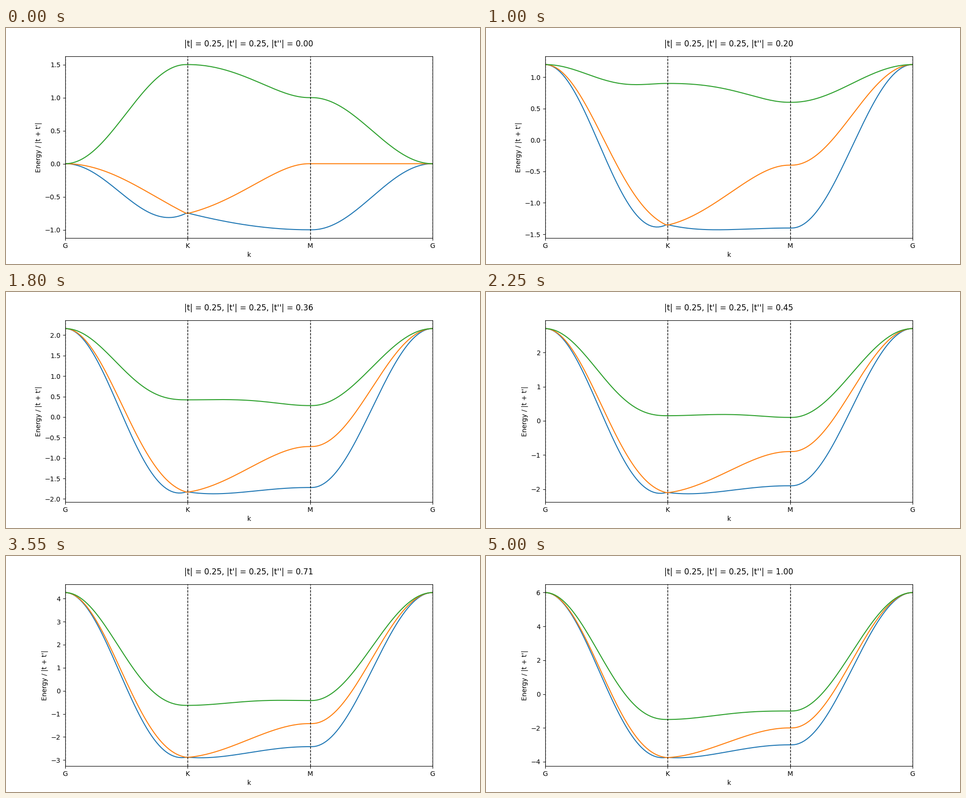
Recreate the animation shown at these times as a matplotlib script. Size 1000x500 px, loop 7000 ms.

```python
import numpy as np
import matplotlib.pyplot as plt
from matplotlib.animation import FuncAnimation

T1, T2 = 0.25, 0.25
STEPS, FRAMES, INTERVAL = 100, 140, 50
N = 50  # samples per path segment, both corners included

# Half phases k.a_i / 2 at the corners of the path G-K-M-G
CORNERS = np.pi * np.array([
    [0, 0, 0],
    [2 / 3, 1 / 3, 1 / 3],
    [1 / 2, 1 / 2, 0],
    [0, 0, 0],
])
phase = np.concatenate([np.linspace(a, b, N)
                        for a, b in zip(CORNERS, CORNERS[1:])])
x = np.linspace(0, 3, len(phase))


def base_bands():
    """Eigenvalues of the three-site model without t'', in units of |t + t'|."""
    s = np.sin(phase)
    h = s[:, :, None] * s[:, None, :]
    h[:, range(3), range(3)] = 0
    return np.linalg.eigvalsh(h)


bands = base_bands()
shift = 2 * np.cos(2 * phase).sum(axis=1, keepdims=True)

fig, ax = plt.subplots(figsize=(10, 5), dpi=100)
lines = ax.plot(x, bands)
for corner in range(4):
    ax.axvline(corner, color="black", linestyle="--", linewidth=1)
ax.set_xlim(0, 3)
ax.set_xticks(range(4), ["G", "K", "M", "G"])
ax.set_xlabel("k")
ax.set_ylabel("Energy / |t + t'|")


def update(frame):
    t3 = min(frame, STEPS) / STEPS
    energy = bands + t3 * shift
    for line, e in zip(lines, energy.T):
        line.set_ydata(e)
    low, high = energy.min(), energy.max()
    pad = 0.05 * (high - low)
    ax.set_ylim(low - pad, high + pad)
    ax.set_title(f"|t| = {T1:.2f}, |t'| = {T2:.2f}, |t''| = {t3:.2f}", pad=15)
    return lines


anim = FuncAnimation(fig, update, frames=FRAMES, interval=INTERVAL,
                     repeat=True, repeat_delay=0, blit=False)
plt.show()
```
